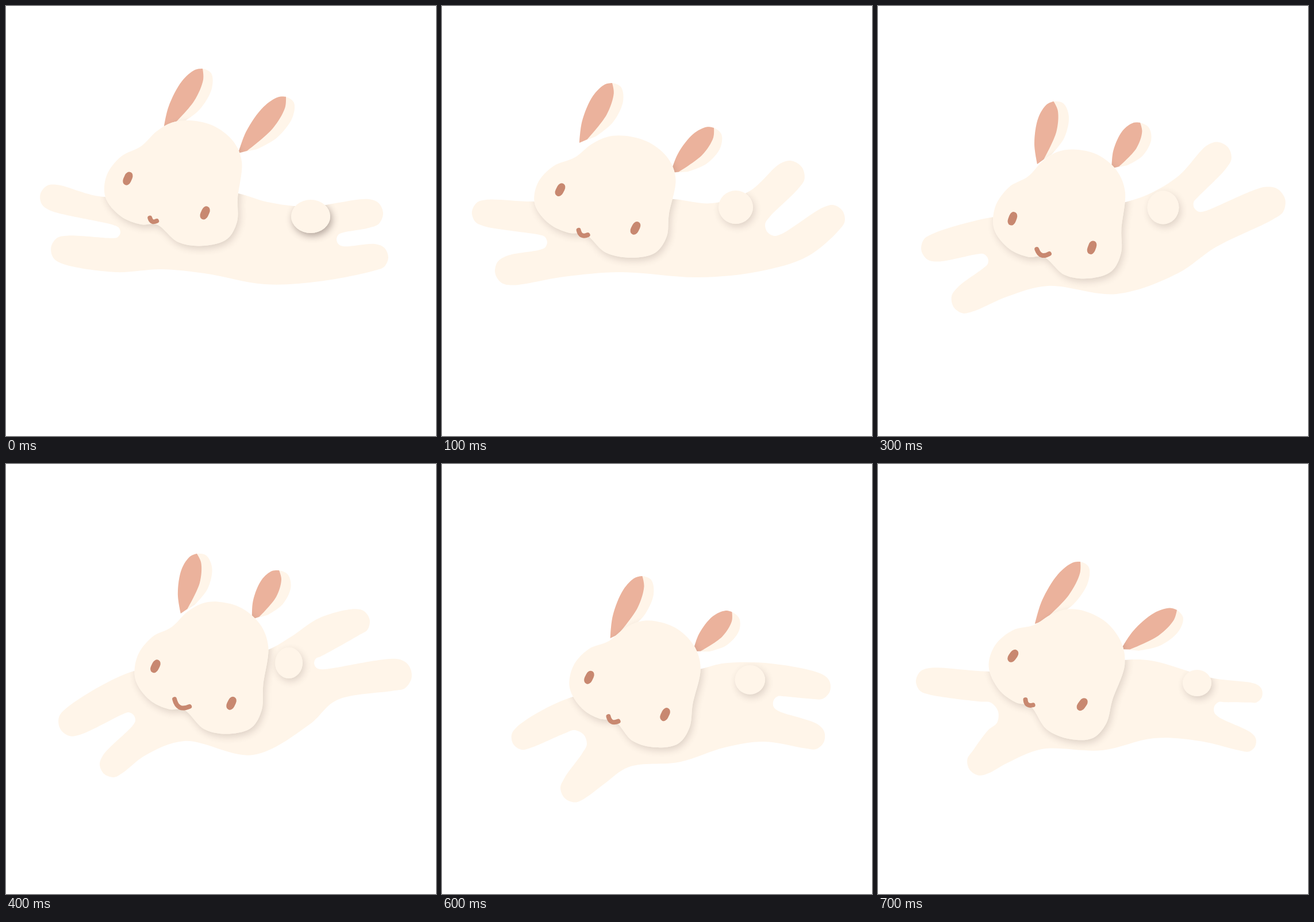
Animation, 748 px wide and 748 px high, one loop 0.8 s. Source, as an HTML page with a canvas:

```html
<!DOCTYPE html>
<html lang="en">
<head>
<meta charset="utf-8">
<title>Running bunny</title>
<style>
  html, body { margin: 0; width: 100%; height: 100%; overflow: hidden; background: #fff; }
  canvas { display: block; width: 100vw; height: 100vh; }
</style>
</head>
<body>
<canvas id="stage" width="748" height="748"></canvas>
<script>
const SIZE = 748, STEP = 100, EYE_GAP = 147;
const CREAM = '#fff5e9', PINK = '#ebb29c', BROWN = '#c88870';
const ctx = document.getElementById('stage').getContext('2d');
const rad = deg => deg * Math.PI / 180;

// Head outline around its centre.
const HEAD = [[28, -109], [70, -100], [105, -73], [120, -38], [113, 27], [112, 67], [95, 97], [55, 109],
  [10, 103], [-28, 72], [-55, 72], [-90, 58], [-117, 25], [-115, -13], [-90, -46], [-55, -64], [-28, -90], [-2, -105]];

// Ear edges: share of the length from base to tip, pixels to the right of that line.
const EAR_LEFT = [[0, 0], [.3, -14], [.7, -18.5], [.93, -10], [1, 0]];
const EAR_RIGHT = [[1.01, 17], [.84, 32], [.5, 34], [.2, 20]];
const EAR_INNER = [[1, 0], [.88, 11], [.56, 18], [.1, 9]];

// limbs: x, y, radius, direction of the paw    gaps between limbs: x, y, radius
// head: x, y, scale x, scale y, turn           face: x, y, tilt, mouth drop, mouth width
// ears: base and tip of each                   tail: x, y, rx, ry, shade
const stretch = {
  back: [404,326, 455,341, 525,349], belly: [545,479, 450,484, 345,465, 270,458, 190,463], neck: [173,332],
  hindUp: [631,361,25,0], hindGap: [587,406,12], hindLow: [642,437,23,0],
  foreLow: [103,424,25,190], foreGap: [188,393,11], foreUp: [82,333,23,197],
  head: [290,308,1,1,0], face: [279,330,24,47,13],
  ears: [274,215,342,109, 404,256,487,158], tail: [530,366,34,29,.42]
};
const kick = {
  back: [404,336, 470,343, 535,322], belly: [635,436, 550,462, 445,472, 310,463, 212,471], neck: [163,340],
  hindUp: [604,296,27,-35], hindGap: [580,382,18], hindLow: [677,370,24,-35],
  foreLow: [118,460,26,170], foreGap: [170,411,13], foreUp: [75,360,23,185],
  head: [282,329,1.017,.966,4], face: [271,353,27,48,18],
  ears: [239,238,296,134, 398,290,473,212], tail: [511,350,30,29,.18]
};
const soar = {
  back: [398,361, 450,352, 502,322], belly: [600,428, 515,477, 400,496, 280,492, 210,503], neck: [182,374],
  hindUp: [568,250,29,-68], hindGap: [577,344,16], hindLow: [682,319,30,-38],
  foreLow: [119,498,27,165], foreGap: [146,442,13], foreUp: [82,393,23,187],
  head: [290,371,.957,1.01,-3], face: [280,406,14,34,17],
  ears: [250,290,279,176, 385,295,437,221], tail: [500,355,31,31,.18]
};
const dive = {
  back: [456,323, 495,301, 545,268], belly: [575,411, 528,453, 430,506, 310,482, 242,507], neck: [226,359],
  hindUp: [610,275,23,-10], hindGap: [547,346,11], hindLow: [678,367,28,10],
  foreLow: [186,522,23,130], foreGap: [212,445,13], foreUp: [117,448,26,150],
  head: [339,353,.967,1.05,2], face: [326,384,26,37,29],
  ears: [304,260,332,156, 428,270,475,185], tail: [492,346,24,27,.18]
};
const reach = {
  back: [463,331, 503,313, 570,294], belly: [560,447, 500,467, 430,495, 352,511, 318,546], neck: [213,411],
  hindUp: [654,343,27,22], hindGap: [583,373,13], hindLow: [645,431,27,25],
  foreLow: [266,557,26,128], foreGap: [259,481,21], foreUp: [178,504,21,122],
  head: [351,356,.92,.986,2], face: [340,385,20,44,21],
  ears: [306,283,346,175, 446,292,494,223], tail: [523,335,27,27,.18]
};
const glide = {
  back: [425,341, 475,342, 580,372], belly: [560,482, 480,477, 390,498, 285,496, 225,520], neck: [195,361],
  hindUp: [652,399,17,22], hindGap: [598,427,14], hindLow: [640,483,18,28],
  foreLow: [179,518,24,145], foreGap: [184,438,26], foreUp: [89,378,23,180],
  head: [308,357,.965,1.02,14], face: [295,376,35,50,16],
  ears: [273,278,352,170, 423,322,520,254], tail: [555,381,25,23,.2]
};

function mix(a, b, k) {
  const pose = {};
  for (const key in a) pose[key] = a[key].map((v, i) => v + (b[key][i] - v) * k);
  return pose;
}

const poses = [stretch, kick, soar, mix(soar, dive, .5), dive, reach,
  { ...mix(reach, glide, .4), sink: 22 }, glide];

const points = list => list.flatMap((v, i) => i % 2 ? [] : [[v, list[i + 1]]]);

// Half circle around a paw, or the other way round inside a gap.
const cap = ([x, y, r, angle], way = 1) => [-90, -45, 0, 45, 90].map(turn => {
  const a = rad(angle + turn * way);
  return [x + r * Math.cos(a), y + r * Math.sin(a)];
});

const gap = (circle, limbA, limbB) => cap([...circle, (limbA[3] + limbB[3]) / 2 + 180], -1);

// Centripetal Catmull-Rom through the points, added to a path.
function curve(path, pts, closed, join) {
  const n = pts.length;
  const at = i => closed ? pts[(i + n) % n] : pts[Math.min(n - 1, Math.max(0, i))];
  const span = (p, q) => Math.max(1e-3, Math.sqrt(Math.hypot(q[0] - p[0], q[1] - p[1])));
  const handle = (p, q, r, a, b) => [0, 1].map(c =>
    (a * a * r[c] - b * b * p[c] + (2 * a * a + 3 * a * b + b * b) * q[c]) / (3 * a * (a + b)));
  if (join) path.lineTo(...pts[0]); else path.moveTo(...pts[0]);
  for (let i = 0; i < (closed ? n : n - 1); i++) {
    const p = at(i - 1), q = at(i), r = at(i + 1), s = at(i + 2);
    const mid = span(q, r);
    path.bezierCurveTo(...handle(p, q, r, span(p, q), mid), ...handle(s, r, q, span(r, s), mid), ...r);
  }
  if (closed) path.closePath();
  return path;
}

const headPath = curve(new Path2D(), HEAD, true);

function fill(path, color) {
  ctx.fillStyle = color;
  ctx.fill(path);
}

function drawBody({ back, belly, neck, head, hindUp, hindGap, hindLow, foreLow, foreGap, foreUp }) {
  const outline = [
    ...points(back),
    ...cap(hindUp), ...gap(hindGap, hindUp, hindLow), ...cap(hindLow),
    ...points(belly),
    ...cap(foreLow), ...gap(foreGap, foreLow, foreUp), ...cap(foreUp),
    neck, head.slice(0, 2)
  ];
  fill(curve(new Path2D(), outline, true), CREAM);
}

function drawEar(bx, by, tx, ty) {
  const dx = tx - bx, dy = ty - by, len = Math.hypot(dx, dy);
  const place = edge => edge.map(([u, v]) => [bx + dx * u - dy / len * v, by + dy * u + dx / len * v]);
  fill(curve(new Path2D(), place([...EAR_LEFT, ...EAR_RIGHT])), CREAM);
  const inner = curve(new Path2D(), place(EAR_LEFT));
  fill(curve(inner, place(EAR_INNER), false, true), PINK);
}

// The shadow only falls on what is already painted.
function drawRaised(path, shade) {
  ctx.save();
  ctx.globalCompositeOperation = 'source-atop';
  ctx.shadowColor = `rgba(70, 50, 45, ${shade})`;
  ctx.shadowOffsetX = 3;
  ctx.shadowOffsetY = 5;
  ctx.shadowBlur = 13;
  fill(path, CREAM);
  ctx.restore();
  fill(path, CREAM);
}

function drawTail([x, y, rx, ry, shade]) {
  const puff = new Path2D();
  puff.ellipse(x, y, rx, ry, 0, 0, Math.PI * 2);
  drawRaised(puff, shade);
}

function drawHead([x, y, sx, sy, turn]) {
  ctx.save();
  ctx.translate(x, y);
  ctx.scale(sx, sy);
  ctx.rotate(rad(turn));
  drawRaised(headPath, .18);
  ctx.restore();
}

function drawFace([x, y, tilt, drop, width]) {
  ctx.save();
  ctx.translate(x, y);
  ctx.rotate(rad(tilt));
  ctx.fillStyle = ctx.strokeStyle = BROWN;
  ctx.beginPath();
  for (const side of [-1, 1])
    ctx.roundRect(side * EYE_GAP / 2 - 7, -12, 14, 24, { x: 6.5, y: 9 });
  ctx.fill();
  ctx.lineWidth = 8;
  ctx.lineCap = 'round';
  ctx.beginPath();
  ctx.moveTo(-4 - width / 2, drop);
  ctx.quadraticCurveTo(-4, drop + width * .6, -4 + width / 2, drop);
  ctx.stroke();
  ctx.restore();
}

function draw(pose) {
  ctx.clearRect(0, 0, SIZE, SIZE);
  ctx.save();
  ctx.translate(0, pose.sink || 0);
  drawBody(pose);
  drawEar(...pose.ears.slice(0, 4));
  drawEar(...pose.ears.slice(4));
  drawTail(pose.tail);
  drawHead(pose.head);
  drawFace(pose.face);
  ctx.restore();
}

const start = performance.now();
function tick() {
  const t = performance.now() - start;
  draw(poses[Math.floor(t / STEP) % poses.length]);
  requestAnimationFrame(tick);
}
tick();
</script>
</body>
</html>
```
